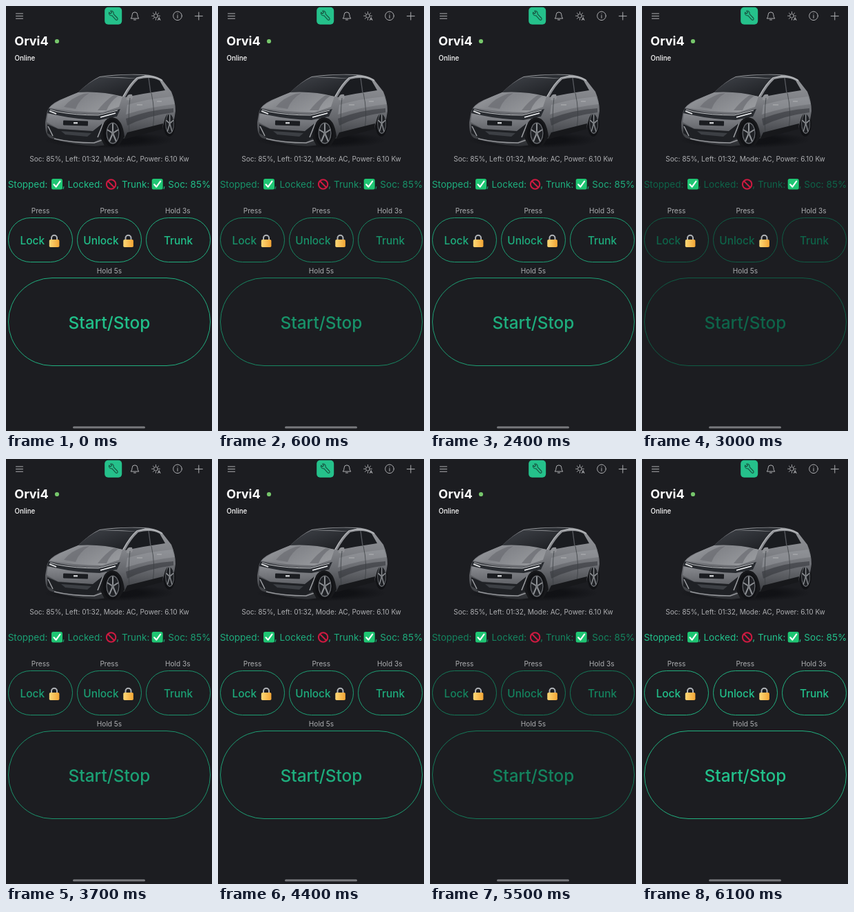
An HTML page for the animation above (6.2 s loop, 299x615 px).

```html
<!DOCTYPE html>
<html lang="en">
<head>
<meta charset="utf-8">
<title>Car remote</title>
<style>
  html, body { margin: 0; height: 100%; overflow: hidden; background: #1c1d21; }
  svg { display: block; width: 100%; height: 100%; }
  text { font-family: Inter, "Liberation Sans", sans-serif; white-space: pre; }
  .mid { text-anchor: middle; }
  .note { font-size: 10.1px; fill: #adaeb1; text-anchor: middle; }
  .status { font-size: 13.5px; fill: currentColor; }
  .label { font-size: 15.4px; font-weight: 500; fill: currentColor; }
  .icon { fill: none; stroke: #aeafb2; stroke-width: 1; stroke-linecap: round; stroke-linejoin: round; }
  .button { fill: none; stroke: currentColor; stroke-width: .9; }
</style>
</head>
<body>
<svg viewBox="0 0 299 615" id="stage">
  <defs>
    <linearGradient id="paint" x1="0" y1="0" x2="0" y2="1">
      <stop offset="0" stop-color="#97999d"/><stop offset=".35" stop-color="#7f8186"/>
      <stop offset=".6" stop-color="#65676c"/><stop offset="1" stop-color="#2b2d31"/>
    </linearGradient>
    <linearGradient id="hood" x1="0" y1="0" x2="1" y2=".5">
      <stop offset="0" stop-color="#a0a2a6"/><stop offset=".5" stop-color="#83858a"/><stop offset="1" stop-color="#96989c"/>
    </linearGradient>
    <linearGradient id="bumper" x1="0" y1="0" x2="0" y2="1">
      <stop offset="0" stop-color="#8d8f94"/><stop offset="1" stop-color="#5f6166"/>
    </linearGradient>
    <linearGradient id="glass" x1="0" y1="0" x2="1" y2="1">
      <stop offset="0" stop-color="#3f4248"/><stop offset="1" stop-color="#1b1d21"/>
    </linearGradient>
    <linearGradient id="gold">
      <stop offset="0" stop-color="#ffd978"/><stop offset="1" stop-color="#f2a534"/>
    </linearGradient>
    <radialGradient id="shade">
      <stop offset=".5" stop-color="#0c0d10"/><stop offset="1" stop-color="#0c0d10" stop-opacity="0"/>
    </radialGradient>
    <g id="check">
      <rect width="16" height="15.5" rx="2.5" fill="#1fc573"/>
      <path d="M3.5 8.3 6.7 11.7 12.5 3.6" fill="none" stroke="#fff" stroke-width="2.1" stroke-linecap="round" stroke-linejoin="round"/>
    </g>
    <g id="padlock">
      <path d="M4 9V5.2a4 4 0 0 1 8 0V9" fill="none" stroke="#b0b3b7" stroke-width="2"/>
      <rect x=".8" y="7.5" width="14.6" height="11" rx="1.8" fill="url(#gold)"/>
    </g>
    <g id="wheel">
      <ellipse rx="13" ry="19.5" fill="#111215"/>
      <ellipse cx="1" rx="9.5" ry="15.5" fill="#6a6d72"/>
      <ellipse cx="1" rx="8.3" ry="14" fill="#1f2125"/>
      <path d="M1 0V-14M1 0 9-5M1 0 6 12M1 0-4 12M1 0-7-5" stroke="#8e9195" stroke-width="2"/>
      <ellipse cx="1" rx="2" ry="3" fill="#7b7e82"/>
    </g>
  </defs>

  <!-- Header -->
  <path class="icon" d="M14.5 11H24.5M14.5 14.6H24.5M14.5 18.2H24.5"/>
  <rect x="143.2" y="1.8" width="25" height="25" rx="5" fill="#25c18b"/>
  <path d="M153.9 13.8a3.6 3.6 0 0 1-4.3-4.7l2.1 2 1.9-1.8-2-2.1a3.6 3.6 0 0 1 4.5 4.5l5.6 5.8a1.7 1.7 0 0 1-2.4 2.4Z" fill="none" stroke="#174f3e" stroke-width="1.1" stroke-linejoin="round"/>
  <path class="icon" d="M181.5 17.8q1.6-1.5 1.6-5a3.9 3.9 0 0 1 7.8 0q0 3.5 1.6 5ZM185.5 20h3"/>
  <g class="icon">
    <circle cx="217.5" cy="14.3" r="2.9"/>
    <path d="M217.5 8.5v1.6M211.7 14.3h1.6M213.4 10.2l1.1 1.1M221.6 10.2l-1.1 1.1M213.4 18.4l1.1-1.1M217.5 20.1v-1.3M223.3 14.3h-1.3M220.5 20.5l1.7-4 1.7 4M221.2 19.2h2"/>
  </g>
  <g class="icon"><circle cx="249" cy="14.3" r="6.3"/><path d="M249 13.5v4M249 11.2v.2"/></g>
  <path class="icon" d="M274.3 14.6h11M279.8 9.1v11"/>

  <text x="12.3" y="57.3" font-size="18" font-weight="700" fill="#fff">Orvi4</text>
  <circle cx="74" cy="51" r="3.1" fill="#76c66b"/>
  <text x="12.5" y="79" font-size="9.7" font-weight="500" fill="#fff">Online</text>

  <!-- Car -->
  <ellipse cx="150" cy="194" rx="95" ry="12" fill="url(#shade)" opacity=".7"/>
  <use href="#wheel" transform="translate(237 170) scale(.68 .96)"/>
  <path d="M60 152Q63 143 78 136L105 125Q121 109 136 102 165 98 199 99 217 100 226 106L240 124Q246 138 246 152L244 165Q237 148 231 162L227 177 170 192 157 200 130 203Q90 200 64 191 56 186 57 168Z" fill="url(#paint)"/>
  <path d="M136 103Q168 98 202 100L190 105Q160 102 136 103Z" fill="#2c2f34"/>
  <path d="M105 125Q120 110 136 103L189 105Q178 116 169 131 137 124 105 125Z" fill="url(#glass)"/>
  <path d="M173 132Q182 115 192 106 211 101 223 108L231 122Q203 126 173 132Z" fill="#1a1c20"/>
  <path d="M207 104 210 126" stroke="#55585d" stroke-width="1.4"/>
  <path d="M170 131Q180 112 190 104 211 98 227 108" fill="none" stroke="#b5b7ba" stroke-width="1.5"/>
  <path d="M175 133q1-6 8-5l1 5q-3 4-9 3Z" fill="#8f9195"/>
  <path d="M105 125Q138 123 169 131L164 146 140 154Q101 154 63 147 74 137 105 125Z" fill="url(#hood)"/>
  <path d="M84 146Q94 133 113 127L121 126Q106 135 101 149ZM133 151Q143 138 156 129L163 130Q151 138 146 151Z" fill="#6b6d72" opacity=".7"/>
  <path d="M176 143Q208 134 241 131L245 142Q208 146 174 157Z" fill="#a4a6aa" opacity=".4"/>
  <path d="M174 163Q208 150 243 148L243 154Q204 159 176 173Z" fill="#303237" opacity=".55"/>
  <path d="M179 186Q177 155 180 133M213 178Q217 152 211 126" fill="none" stroke="#3d4045" stroke-width=".8"/>
  <path d="M176 183 228 170 227 178 171 193Z" fill="#17181b"/>
  <path d="M190 143h8M219 138h7" stroke="#b3b5b8" stroke-width="1.1"/>
  <path d="M61 155Q99 163 136 161L164 153 157 164 138 177 128 182 75 177 59 168Z" fill="url(#bumper)"/>
  <path d="M61 148 75 151Q100 157 134 157L166 149 161 160 136 165Q102 164 74 158L60 155Z" fill="#292c31"/>
  <path d="M64 150 75 153Q100 158 134 158L162 151" fill="none" stroke="#c9cbce" stroke-width="1"/>
  <path d="M137 161 159 155M63 152 73 156" stroke="#f2f4f6" stroke-width="1.8"/>
  <rect x="83" y="166" width="36" height="7" rx="1" fill="#1b1d21" transform="rotate(2 101 169)"/>
  <rect x="98" y="168" width="6" height="2.5" fill="#c6c8ca"/>
  <path d="M60 171 76 178 126 181 140 170 137 192 123 199 75 193 60 184Z" fill="#1f2125"/>
  <path d="M80 181 124 184 118 189 86 186Z" fill="#3c3f44"/>
  <path d="M61 174 68 188M141 170 133 190" stroke="#9ea0a4" stroke-width="1.5"/>
  <path d="M70 192Q95 198 128 198L142 193" fill="none" stroke="#94969a" stroke-width="1.6"/>
  <path d="M137 191Q139 162 154 161 169 162 172 189L164 202H143Z" fill="#17181b"/>
  <use href="#wheel" x="154" y="184"/>

  <text class="note" x="150" y="225.3">Soc: 85%, Left: 01:32, Mode: AC, Power: 6.10 Kw</text>

  <!-- Status -->
  <text class="status" x="2.7" y="263">Stopped:</text>
  <use href="#check" x="66" y="250"/>
  <text class="status" x="81.8" y="263">, Locked:</text>
  <g fill="none" stroke="#cf1a41" stroke-width="2">
    <circle cx="152.6" cy="258" r="6.7"/>
    <path d="M147.9 253.3 157.3 262.7"/>
  </g>
  <text class="status" x="160.3" y="263">, Trunk:</text>
  <use href="#check" x="211.7" y="250"/>
  <text class="status" x="227.7" y="263">, Soc: 85%</text>

  <!-- Controls -->
  <text class="note" x="50" y="300">Press</text>
  <text class="note" x="149.7" y="300">Press</text>
  <text class="note" x="249.3" y="300">Hold 3s</text>
  <rect class="button" x="3.5" y="306.5" width="93" height="64" rx="32"/>
  <rect class="button" x="103.5" y="306.5" width="93" height="64" rx="32"/>
  <rect class="button" x="203.5" y="306.5" width="93" height="64" rx="32"/>
  <text class="label" x="20.5" y="345.3">Lock</text>
  <use href="#padlock" x="62" y="330.5"/>
  <text class="label" x="112.3" y="345.3">Unlock</text>
  <use href="#padlock" x="169.5" y="330.5"/>
  <text class="label mid" x="250" y="345.3">Trunk</text>
  <text class="note" x="150" y="387.3">Hold 5s</text>
  <rect class="button" x="3.5" y="393.5" width="293" height="127" rx="63.5"/>
  <text class="label mid" x="150" y="467.3" style="font-size:24.4px">Start/Stop</text>

  <rect x="97" y="608.3" width="105" height="3" rx="1.5" fill="#76777b"/>
</svg>
<script>
  const stage = document.getElementById('stage');
  const LOOP = 6200, STEP = 100, PULSE = 2000, PEAK = 100;
  const DIM = [13, 98, 71], BRIGHT = [34, 193, 139];

  function draw(now) {
    const t = Math.floor(now % LOOP / STEP) * STEP;
    const level = (1 + Math.cos((t - PEAK) / PULSE * 2 * Math.PI)) / 2;
    const rgb = DIM.map((c, i) => Math.round(c + (BRIGHT[i] - c) * level));
    stage.style.color = `rgb(${rgb})`;
  }

  const start = performance.now();
  function tick() {
    draw(performance.now() - start);
    requestAnimationFrame(tick);
  }
  tick();
</script>
</body>
</html>
```
